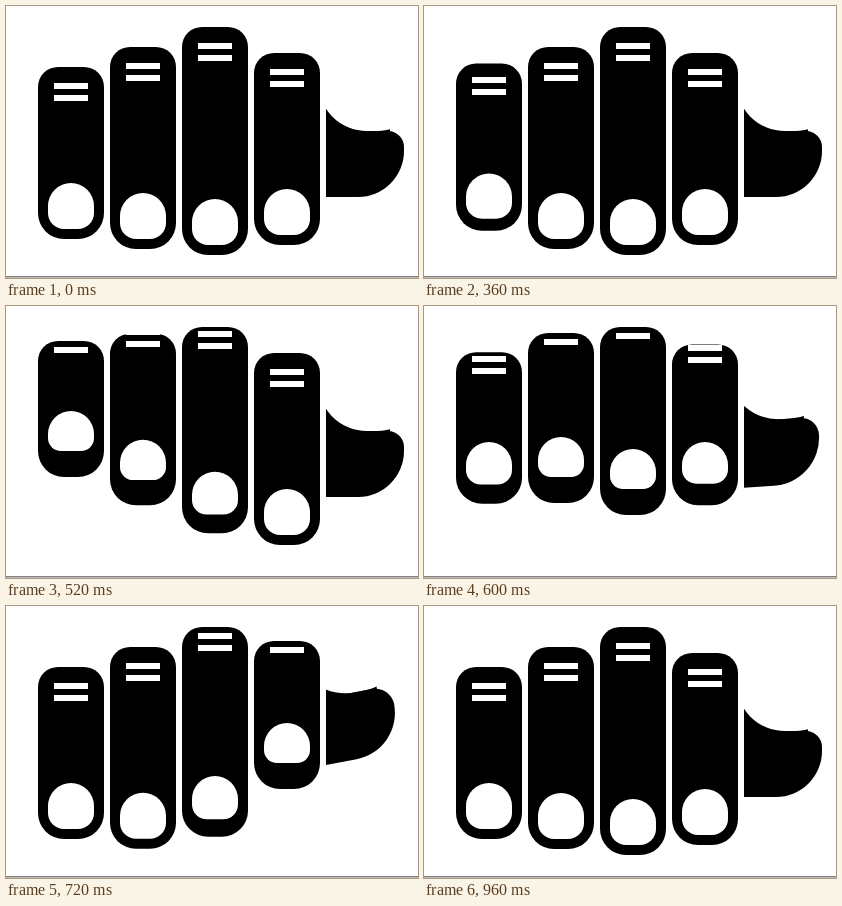
Recreate the animation shown at these times as an HTML page with a canvas. Size 412 by 272 pixels, loop 1200 ms.

```html
<!DOCTYPE html>
<html lang="en">
<head>
<meta charset="utf-8">
<title>Tapping fingers</title>
<style>
html, body { margin: 0; width: 100%; height: 100%; overflow: hidden; background: #fff; }
canvas { display: block; }
</style>
</head>
<body>
<canvas id="stage" width="412" height="272"></canvas>
<script>
const ctx = document.getElementById('stage').getContext('2d');
const LOOP = 1200, STEP = 40;

// Each pose is [top, bottom]; keys are rise start, raised, fall start, settled (percent).
const fingers = [
  { x: 32,  rest: [61, 233], up: [35, 171], keys: [20, 29, 35, 41] },
  { x: 104, rest: [41, 243], up: [27, 197], keys: [24, 33, 39, 45] },
  { x: 176, rest: [21, 249], up: [21, 209], keys: [28, 37, 42.4, 48.6] },
  { x: 248, rest: [47, 239], up: [35, 183], keys: [32, 41, 47.5, 53.3] }
];

const lerp = (a, b, k) => a + (b - a) * k;
const linear = x => x;

// cubic-bezier(0, 0, .58, 1)
function easeOut(x) {
  let lo = 0, hi = 1;
  for (let i = 0; i < 20; i++) {
    const s = (lo + hi) / 2;
    if (1.74 * s * s - 0.74 * s * s * s < x) lo = s; else hi = s;
  }
  return lo * lo * (3 - 2 * lo);
}

function lift(p, [a, b, c, d], ease) {
  if (p <= a || p >= d) return 0;
  if (p < b) return ease((p - a) / (b - a));
  return p <= c ? 1 : 1 - ease((p - c) / (d - c));
}

function box(x, y, w, h, radii, color) {
  ctx.fillStyle = color;
  ctx.beginPath();
  ctx.roundRect(x, y, w, h, radii);
  ctx.fill();
}

function drawFinger({ x, rest, up, keys }, p) {
  const k = lift(p, keys, easeOut);
  const top = lerp(rest[0], up[0], k);
  const bottom = lerp(rest[1], up[1], k);
  box(x, top, 66, bottom - top, [20, 20, 26, 26], '#000');

  const bar = Math.round(top + lerp(16, -6, k));
  box(x + 16, bar, 34, 6, 0, '#fff');
  box(x + 16, bar + 12, 34, 6, 0, '#fff');

  const h = lerp(46, 40, k);
  const upper = lerp(33, 23, k), lower = lerp(23, 13, k);
  box(x + 10, bottom - lerp(10, 26, k) - h, 46, h, [upper, upper, lower, lower], '#fff');
}

function drawThumb(p) {
  const k = lift(p, [34, 43, 50, 60], linear);
  const turn = lift(p, [34, 43, 43, 60], linear);
  const w = 86, h = 66;
  ctx.save();
  ctx.beginPath();
  ctx.rect(320, 0, 78, 272);
  ctx.clip();
  ctx.translate(312 - 6.5 * k + w / 2, lerp(125, 87, k) + h / 2);
  ctx.rotate(-12 * turn * Math.PI / 180);
  ctx.translate(-w / 2, -h / 2);
  // web of skin, hollowed out by a white rounded box
  box(0, -26, 72, 27, 0, '#000');
  box(0, -66, 108, 66, [0, 0, 49, 49], '#fff');
  box(0, 0, w, h, [0, lerp(16, 26, k), lerp(46, 65, k), 0], '#000');
  ctx.restore();
}

function draw(ms) {
  const p = (ms - 49) / 15;
  box(0, 0, 412, 272, 0, '#fff');
  for (const f of fingers) drawFinger(f, p);
  drawThumb(p);
  box(0, 270, 412, 1.5, 0, '#808080');
}

const start = performance.now();
function tick() {
  const t = (performance.now() - start) % LOOP;
  draw(Math.floor(t / STEP) * STEP);
  requestAnimationFrame(tick);
}
tick();
</script>
</body>
</html>
```
